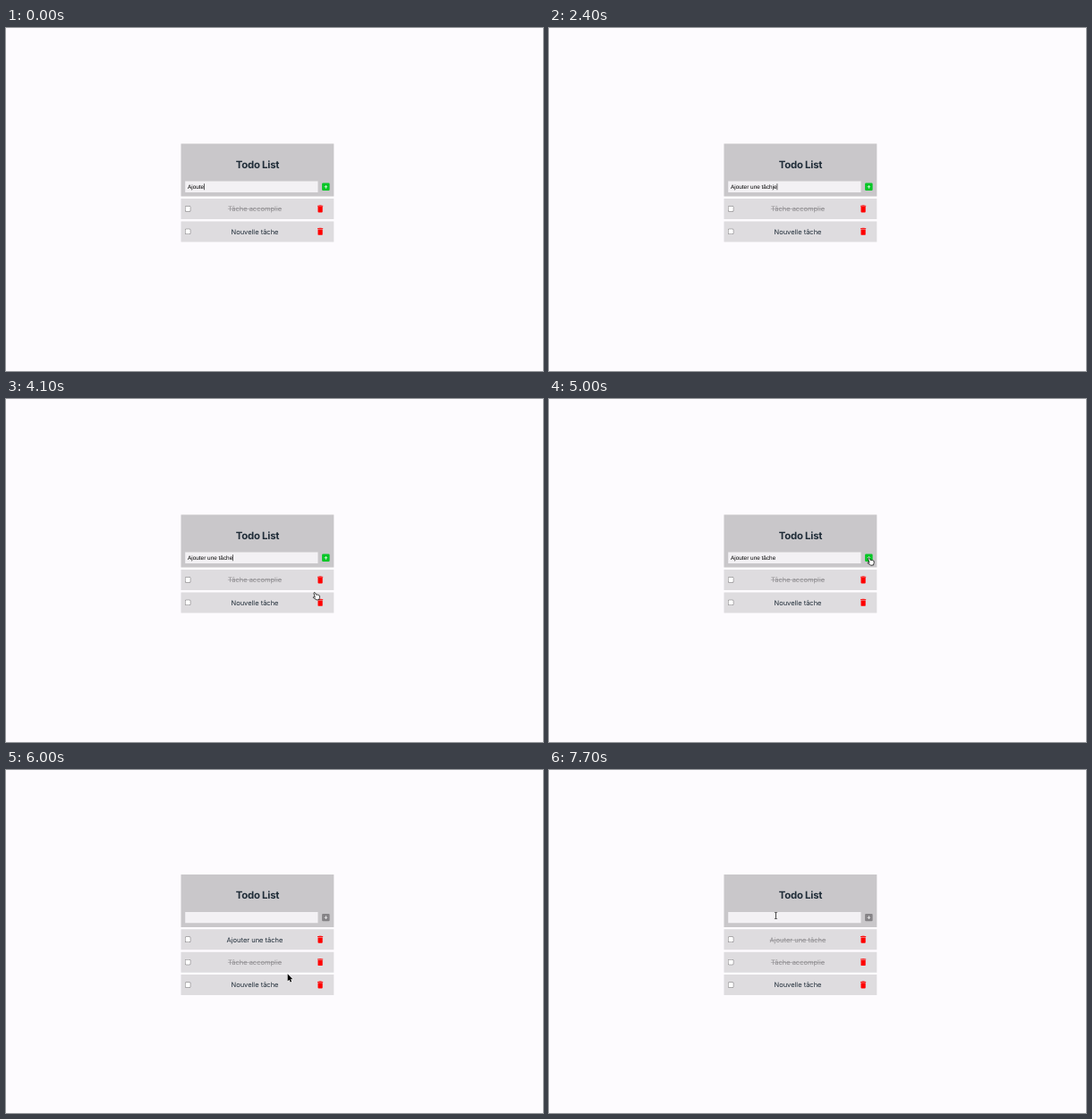
An HTML page with a canvas for the animation above (8 s loop, 600 by 384 pixels).

```html
<!DOCTYPE html>
<html lang="fr">
<head>
<meta charset="utf-8">
<title>Todo List</title>
<style>
  html, body { margin: 0; width: 100%; height: 100%; overflow: hidden; background: #fdfbfe; }
  canvas { display: block; }
</style>
</head>
<body>
<canvas width="600" height="384"></canvas>
<script>
const ctx = document.querySelector('canvas').getContext('2d');
const LOOP = 8000, STEP = 100, KEY_DELAY = 50, BLINK = 500;
const ADDED = 5100, DONE = 6800;
const LEFT = 195.5, WIDTH = 170.8, PITCH = 25.4;
const INK = '#1f2c38', MUTED = '#8e8c8f';

// Bursts of keys by start time; '<' is backspace.
const bursts = {
  100: 'r ', 500: 'un', 800: 'e ', 1300: 't', 1900: 'â',
  2100: 'c', 2300: 'hje', 2900: '<', 3000: '<e'
};

const easeOut = k => 1 - (1 - k) ** 5;
const easeInOut = k => k * k * (3 - 2 * k);

// Each move bends from one point towards `via` and ends at `to`.
const moves = [
  { start: 3900, end: 4700, from: [367, 358], via: [321, 257], to: [357.5, 178], ease: easeOut },
  { start: 5300, end: 6600, from: [357.5, 177.5], via: [368, 273], to: [203, 189.5], ease: easeInOut },
  { start: DONE, end: 7700, from: [203, 189.5], via: [243, 152], to: [253.5, 163], ease: easeInOut }
];

const arrowShape = new Path2D('M0 0V8.2L1.9 6.5L3.1 9.2L4.5 8.6L3.3 6H5.7Z');
const handShape = new Path2D(
  'M-.9 .4C-.6-.4 .3-.4 .7 .3L2 2.8C2.5 2.3 3.2 2.4 3.5 2.9C4 2.5 4.6 2.6 4.9 3.2' +
  'C5.6 3 6 3.5 6.1 4.2C6.3 5.6 6.1 6.5 5.7 7.3L5.6 8.5L2.2 9L1.4 8C.3 7.5-.9 7-1.7 6.1' +
  'C-1.9 5.3-1 5-.2 5.5L.5 5.9L-.8 1.4Z');

function rect(x, y, w, h, color, radius = 0) {
  ctx.fillStyle = color;
  ctx.beginPath();
  ctx.roundRect(x, y, w, h, radius);
  ctx.fill();
}

function text(str, x, y, font, color, align = 'center', spacing = 0) {
  ctx.font = font;
  ctx.letterSpacing = spacing + 'px';
  ctx.textAlign = align;
  ctx.fillStyle = color;
  ctx.fillText(str, x, y);
  return ctx.measureText(str).width;
}

function typedAt(t) {
  let value = 'Ajoute', lastKey = 0;
  for (const [start, keys] of Object.entries(bursts)) {
    [...keys].forEach((key, i) => {
      const time = +start + i * KEY_DELAY;
      if (time > t) return;
      value = key === '<' ? value.slice(0, -1) : value + key;
      lastKey = time;
    });
  }
  return { value, caretOn: (t - lastKey) % (2 * BLINK) < BLINK };
}

function drawHeader(top, { value, caretOn }) {
  rect(LEFT, top, WIDTH, 59, '#c9c7ca');
  text('Todo List', 281, top + 27.5, 'bold 11.4px Inter, sans-serif', INK, 'center', -0.24);
  rect(200.2, top + 42, 148.3, 12.3, '#f3f1f4');
  const width = text(value, 203, top + 50.4, '6.42px "Liberation Sans", Arial, sans-serif', '#000', 'left');
  if (caretOn) rect(203 + width, top + 44.6, 0.6, 7, '#000');

  rect(353.1, top + 44, 8.5, 8.4, value ? '#05c626' : '#858386', 1.2);
  rect(355.5, top + 47.9, 3.7, 0.7, '#fff');
  rect(357, top + 46.4, 0.7, 3.7, '#fff');
}

function drawTask(top, label, done) {
  const mid = top + 11.5;
  rect(LEFT, top, WIDTH, 23, '#dedcdf');
  rect(200, mid - 3.2, 6.3, 6.3, '#767477', 1.2);
  rect(200.5, mid - 2.7, 5.3, 5.3, '#fff', 0.8);
  const width = text(label, 278, mid + 2.7, '7.5px Inter, sans-serif', done ? MUTED : INK);
  if (done) rect(278 - width / 2, mid + 0.1, width, 0.5, MUTED);

  rect(348, mid - 3.7, 6.2, 0.9, '#f00');
  rect(349.6, mid - 4.1, 3, 0.5, '#f00');
  rect(348.5, mid - 2.4, 5.2, 6.3, '#f00', [0, 0, 0.9, 0.9]);
}

function pointerAt(t) {
  const move = moves.findLast(m => m.start <= t);
  if (!move) return null;
  const k = move.ease(Math.min(1, (t - move.start) / (move.end - move.start)));
  return [0, 1].map(axis =>
    (1 - k) ** 2 * move.from[axis] + 2 * k * (1 - k) * move.via[axis] + k * k * move.to[axis]);
}

function drawPointer(t) {
  const position = pointerAt(t);
  if (!position) return;
  const [x, y] = position;
  ctx.save();
  ctx.translate(x, y);
  ctx.lineJoin = 'round';
  if (t < ADDED && y < 240) {
    ctx.scale(0.92, 0.92);
    ctx.fillStyle = '#fff';
    ctx.strokeStyle = '#000';
    ctx.lineWidth = 0.8;
    ctx.fill(handShape);
    ctx.stroke(handShape);
  } else if (t > DONE && y < 171) {
    rect(-0.4, -3.6, 0.8, 7.2, '#222');
    for (const end of [-4, 3.4]) rect(-1.6, end, 3.2, 0.6, '#222');
  } else {
    ctx.strokeStyle = '#fff';
    ctx.lineWidth = 1.1;
    ctx.stroke(arrowShape);
    ctx.fillStyle = '#000';
    ctx.fill(arrowShape);
  }
  ctx.restore();
}

function draw(now) {
  const t = Math.floor((now % LOOP) / STEP) * STEP;
  const added = t >= ADDED;
  const input = added ? { value: '', caretOn: false } : typedAt(t);
  const tasks = [['Tâche accomplie', true], ['Nouvelle tâche', false]];
  if (added) tasks.unshift(['Ajouter une tâche', t >= DONE]);

  rect(0, 0, 600, 384, '#fdfbfe');
  const top = 129.6 - (added ? PITCH / 2 : 0);
  drawHeader(top, input);
  tasks.forEach(([label, done], i) => drawTask(top + 61.4 + i * PITCH, label, done));
  drawPointer(t);
}

ctx.textRendering = 'geometricPrecision';
const start = performance.now();
function frame() {
  draw(performance.now() - start);
  requestAnimationFrame(frame);
}
frame();
</script>
</body>
</html>
```
